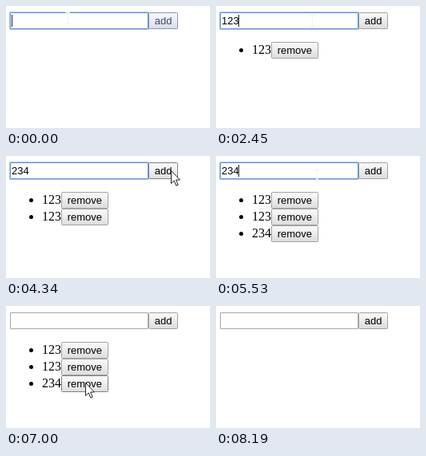
Recreate the animation shown at these times as an HTML page. Size 255 by 153 pixels, loop 8610 ms.

```html
<!DOCTYPE html>
<html lang="en">
<head>
<meta charset="utf-8">
<title>Add and remove list</title>
<style>
html, body { margin: 0; width: 100%; height: 100%; overflow: hidden; background: #fff; }
svg { display: block; width: 255px; height: 153px; }
text { font: 13px "Liberation Sans", Arial, sans-serif; fill: #000; white-space: pre; }
.item { font: 16px "Liberation Serif", "Times New Roman", serif; }
.button rect { fill: url(#normal); stroke: #a3a3a3; }
.button.cool rect { fill: url(#cool); stroke: #8c95ad; }
.button.cool text { fill: #414a68; }
.button.hover rect { fill: url(#hover); stroke: #808080; }
.button.down rect { fill: url(#down); stroke: #9a9a9a; }
</style>
</head>
<body>
<svg id="stage" viewBox="0 0 255 153" xmlns="http://www.w3.org/2000/svg"><defs id="defs"></defs></svg>
<script>
const LOOP = 8610, STEP = 70, BLINK = 490;
const stage = document.getElementById('stage');

// Script: focus the field, type, go to the button, release the click
const cycles = [
  { text: '123', home: [77, 14], focus: -350, type: 910, go: 1120, goal: [190, 15], release: 1820 },
  { text: '123', home: [120, 18], focus: 2170, type: 2310, go: 2730, goal: [196, 19], release: 3150 },
  { text: '234', home: [120, 19], focus: 3500, type: 3640, go: 3850, goal: [206, 18], release: 4480 },
  { text: '234', home: [126, 24], focus: 4900, type: 5180, go: 5530, goal: [198, 16], release: 6160 }
];
const rowY = i => 45 + 21 * i;
const drops = cycles.map((c, i) => 6860 + 350 * i);
const clicks = [...cycles.map(c => c.release), ...drops];

// Every pointer move: start, duration, destination
const moves = [];
cycles.forEach((c, i) => {
  moves.push([c.go, 350, c.goal]);
  if (i < 3) moves.push([c.release - STEP, 240, cycles[i + 1].home]);
});
drops.forEach((drop, i) => {
  const goal = [99, rowY(3 - i) + 9];
  moves.push(i ? [drops[i - 1], 140, goal] : [cycles[3].release, 490, goal]);
});
moves.push([drops[3], 280, [176, 140]]);

function pointer(t) {
  let pos = cycles[0].home;
  for (const [start, duration, goal] of moves) {
    if (t <= start) break;
    const k = Math.min(1, (t - start) / duration);
    const ease = 1 - (1 - k) ** 3;
    pos = pos.map((p, n) => p + (goal[n] - p) * ease);
  }
  return pos.map(Math.round);
}

function add(parent, tag, attrs, content = '') {
  const el = document.createElementNS('http://www.w3.org/2000/svg', tag);
  for (const key in attrs) el.setAttribute(key, attrs[key]);
  el.textContent = content;
  return parent.appendChild(el);
}

function gradient(id, top, bottom) {
  const g = add(document.getElementById('defs'), 'linearGradient', { id, x1: 0, y1: 0, x2: 0, y2: 1 });
  add(g, 'stop', { offset: 0.2, 'stop-color': top });
  add(g, 'stop', { offset: 1, 'stop-color': bottom });
}
gradient('normal', '#f5f5f5', '#dcdcdc');
gradient('hover', '#f8f8f8', '#dedede');
gradient('down', '#e4e4e4', '#f0f0f0');
gradient('cool', '#f4f5fa', '#d9dce8');

function button(parent, x, y, w, label) {
  const el = add(parent, 'g', {});
  add(el, 'rect', { x: x + 0.5, y: y + 0.5, width: w - 1, height: 20, rx: 1 });
  add(el, 'text', { x: x + 7.7, y: y + 15 }, label);
  return { el, x, y, w };
}

const frame = (x, y, width, height, stroke) =>
  add(stage, 'rect', { x, y, width, height, rx: 0.5, fill: 'none', stroke });

const inside = ([x, y], b) => x >= b.x && x < b.x + b.w && y >= b.y && y < b.y + 21;
const show = (el, on) => el.setAttribute('visibility', on ? 'visible' : 'hidden');
const move = (el, [x, y]) => el.setAttribute('transform', `translate(${x} ${y})`);

// Scene
const field = { x: 5, y: 8, w: 173 };
const border = frame(5.5, 8.5, 172, 20, '#a6a6a6');
const addButton = button(stage, 178, 8, 37, 'add');
const rings = [
  frame(4.5, 7.5, 174, 22, 'rgba(90, 143, 224, 0.5)'),
  frame(5.5, 8.5, 172, 20, '#5f90dc')
];
const value = add(stage, 'text', { x: 7, y: 23 });
const caret = add(stage, 'rect', { y: 11, width: 1, height: 15, fill: '#222' });

const rows = cycles.map((c, i) => {
  const g = add(stage, 'g', {}), y = rowY(i);
  add(g, 'circle', { cx: 31.5, cy: y + 10.5, r: 2.5 });
  add(g, 'text', { class: 'item', x: 45, y: y + 15 }, c.text);
  return { g, button: button(g, 69, y, 59, 'remove') };
});

const beam = add(stage, 'g', { fill: 'none' });
const beamShape = 'M-3 -6.5H3M0.5 -6V7M-3 7.5H4';
add(beam, 'path', { d: beamShape, stroke: '#fff', 'stroke-width': 2 });
add(beam, 'path', { d: beamShape, stroke: '#f1f1ee' });
const arrow = add(stage, 'path', {
  d: 'M.5 .5V16.5L4.2 13L6.8 19.2L9.2 18.2L6.6 12H11.5Z',
  fill: '#fff', stroke: '#26222e'
});

function draw(now) {
  const t = Math.floor((now % LOOP) / STEP) * STEP;
  const cycle = cycles.findLast(c => c.focus <= t);
  const typed = Math.floor((t - cycle.type) / STEP) + 1;
  const text = t < cycle.release ? cycle.text.slice(0, Math.max(0, typed)) : '';
  const edited = typed > 0 ? Math.min(t, cycle.type + 2 * STEP) : cycle.focus;
  const focused = t < cycle.release - STEP;
  const blinkOn = Math.floor((t - edited) / BLINK) % 2 === 0;
  const down = clicks.some(c => t >= c - STEP && t < c);
  const count = cycles.filter(c => c.release <= t).length - drops.filter(d => d <= t).length;
  const pos = pointer(t), typing = inside(pos, field), visible = t < drops[3] + 280;

  const paint = (b, cool) => {
    const state = visible && inside(pos, b) ? (down ? 'down' : 'hover') : '';
    b.el.setAttribute('class', `button ${cool ? 'cool' : ''} ${state}`);
  };

  value.textContent = text;
  caret.setAttribute('x', 7 + 7 * text.length);
  show(caret, focused && blinkOn);
  show(border, !focused);
  rings.forEach(r => show(r, focused));
  paint(addButton, t < cycles[0].release);
  rows.forEach((row, i) => {
    show(row.g, i < count);
    paint(row.button, false);
  });
  show(beam, visible && typing);
  show(arrow, visible && !typing);
  move(beam, pos);
  move(arrow, pos);
}

const start = performance.now();
function tick() {
  draw(performance.now() - start);
  requestAnimationFrame(tick);
}
tick();
</script>
</body>
</html>
```
